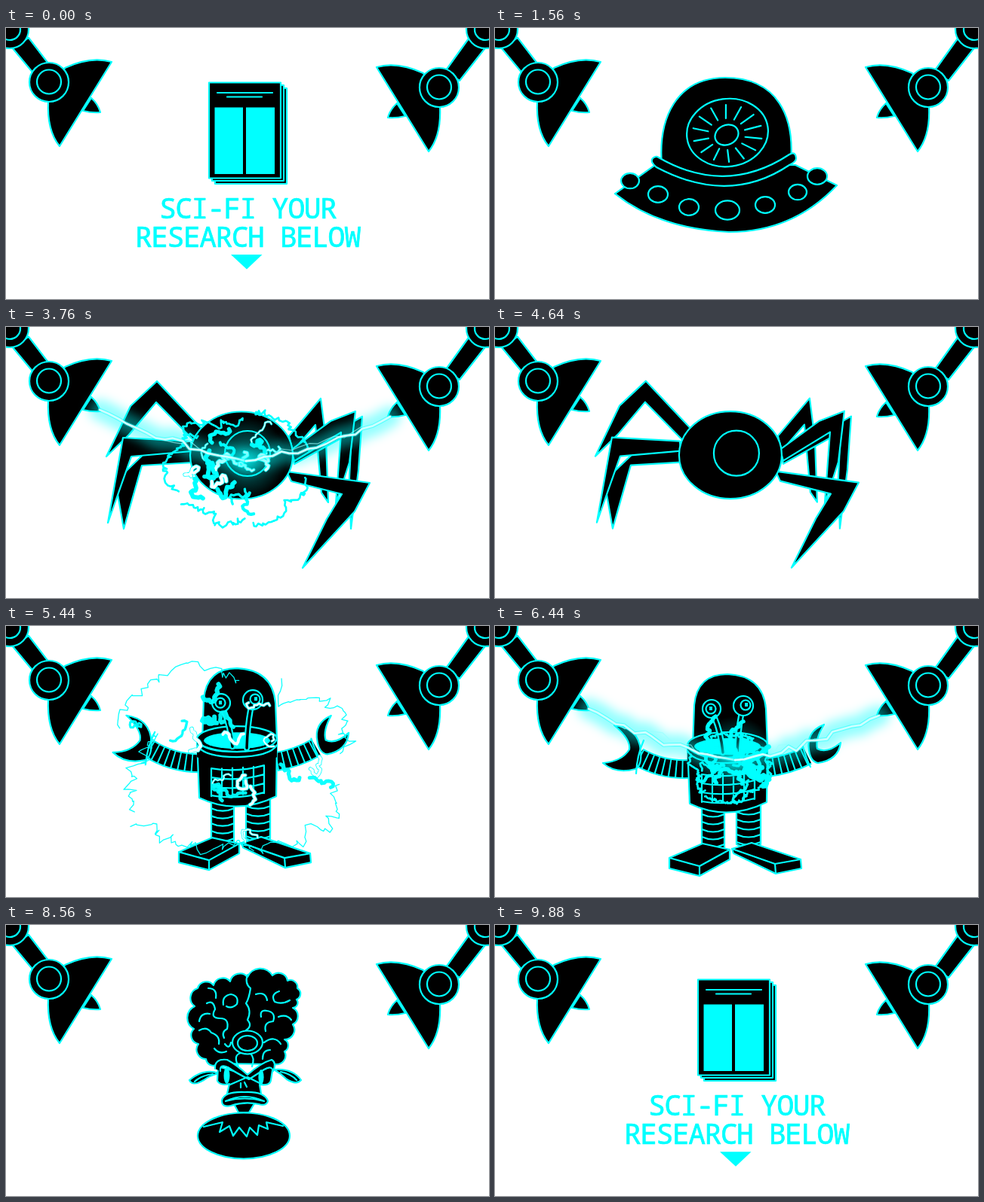
An HTML page with a canvas for the animation above (9.92 s loop, 640 by 360 pixels).

```html
<!DOCTYPE html>
<html lang="en">
<head>
<meta charset="utf-8">
<title>Sci-fi your research</title>
<style>
  html, body { margin: 0; width: 100%; height: 100%; overflow: hidden; background: #fff; }
  svg, canvas { position: absolute; left: 0; top: 0; width: 640px; height: 360px; }
  svg { fill: #000; stroke: #0ff; stroke-width: 2.2; stroke-linejoin: round; stroke-linecap: round; }
  .line { fill: none; }
  .cyan { fill: #0ff; stroke: none; }
  .scene { display: none; }
  text { font: 400 38px "Noto Sans Mono", "DejaVu Sans Mono", monospace; letter-spacing: -1.5px; fill: #0ff; stroke-width: .7; }
  .tube { fill: none; stroke-linecap: butt; }
</style>
</head>
<body>
<svg viewBox="0 0 640 360">
  <defs>
    <g id="gun">
      <path d="M113 93Q122 101 125 112Q114 113 102 110Z"/>
      <path d="M140 45Q112 37 78 53L56 97Q54 136 71 157Z"/>
      <circle cx="57" cy="72" r="26"/>
      <circle cx="57" cy="71.500" r="16"/>
    </g>
    <g id="joint"><circle r="25"/><circle r="14"/></g>
  </defs>

  <g id="book" class="scene">
    <rect x="277" y="80" width="95" height="127"/>
    <rect x="273" y="76" width="95" height="127"/>
    <rect x="269" y="72.500" width="95" height="127"/>
    <path class="line" d="M280 86H353M293 91.500H339"/>
    <path class="cyan" d="M276.500 105.500h37.500v88.500h-37.500zM318 105.500h38v88.500h-38z"/>
    <text x="203" y="252.500">SCI-FI YOUR</text>
    <text x="171" y="291">RESEARCH BELOW</text>
    <path id="arrow" class="cyan" d="M298 301H339.500L319 320.500Z"/>
  </g>

  <g id="ufo" class="scene">
    <path d="M159 220L212 182H398L453 209Q395 271 310 271Q218 267 159 220Z"/>
    <path d="M221 182C216 120 240 66 305 66C375 66 397 118 392 178Q310 225 221 182Z"/>
    <path d="M215 171Q305 224 390 168Q398 163 399 173Q399 178 390 182Q310 236 214 185Q205 178 209 173Q212 170 215 171Z"/>
    <ellipse cx="308" cy="139" rx="54" ry="45" transform="rotate(-8 308 139)"/>
    <ellipse cx="307" cy="142" rx="16" ry="13" transform="rotate(-25 307 142)"/>
    <path id="rays"/>
    <g id="ports"></g>
  </g>

  <g id="spider" class="scene">
    <path d="M262 138L200 72 165 105 133 172 163 143 199 100 250 152Z"/>
    <path d="M247 165L200 152 145 205 156 268 180 184 247 180Z"/>
    <path d="M245 152L155 147 135 260 166 172 246 165Z"/>
    <path d="M375 145L417 95 424 150 427 233 418 220 410 130 380 165Z"/>
    <path d="M380 172L472 119 467 190 457 268 455 200 458 140 382 182Z"/>
    <path d="M378 163L430 125 463 112 455 180 437 235 444 140 382 178Z"/>
    <path d="M372 192L482 207 462 245 393 320 425 255 445 222 378 205Z"/>
    <ellipse cx="312" cy="170.500" rx="68" ry="58"/>
    <circle cx="320" cy="168" r="30"/>
  </g>

  <g id="robot" class="scene">
    <path d="M274 240V296Q289 303 304 296V240ZM320 238V290Q336 298 352 290V238Z"/>
    <path id="bands" class="line"/>
    <path d="M231 308L275 289 311 297V310L271 332 231 322Z"/>
    <path class="line" d="M231 308L271 319 311 297M271 319V332"/>
    <path d="M314 296L340 288 405 310 406 322 372 329 316 302Z"/>
    <path class="line" d="M314 296L371 316 405 310M371 316L372 329"/>
    <g id="armL">
      <g class="arm" data-d="M258 190Q222 192 190 174"></g>
      <path d="M193 165Q190 135 158 132Q180 150 178 164Q168 180 143 182Q160 197 186 190Q195 185 193 165Z"/>
      <path class="line" d="M197 152Q188 172 187 196"/>
    </g>
    <g id="armR">
      <g class="arm" data-d="M360 188Q388 185 414 172"></g>
      <path d="M416 165Q412 140 436 131Q424 150 427 163Q440 170 458 155Q455 178 428 182Q418 180 416 165Z"/>
      <path class="line" d="M408 160Q412 176 418 187"/>
    </g>
    <path d="M262 160L264 105Q268 64 308 64Q355 66 359 110L361 160Z"/>
    <path d="M255 158L258 236Q308 260 360 234L361 158Z"/>
    <ellipse cx="308" cy="158" rx="53" ry="17"/>
    <ellipse class="cyan" cx="308" cy="160" rx="44" ry="11"/>
    <path class="line" d="M291 122Q299 140 302 168M326 119Q322 140 321 170" stroke-width="8"/>
    <path class="line" d="M291 122Q299 140 302 168M326 119Q322 140 321 170" style="stroke:#000" stroke-width="3.500"/>
    <path d="M255 158Q260 175 308 175Q355 174 361 158V182Q308 200 255 182Z" stroke="none"/>
    <path class="line" d="M255 158Q260 175 308 175Q355 174 361 158M255 166Q264 182 308 182Q352 181 361 166"/>
    <circle cx="287" cy="110" r="12"/><circle cx="286" cy="110" r="6.500"/>
    <circle cx="329" cy="106" r="13"/><circle cx="332" cy="105" r="6.500"/>
    <path class="cyan" d="M284 107h4v5h-4zM331 102h4v5h-4z"/>
    <path id="grid" class="line"/>
  </g>

  <g id="alien" class="scene">
    <path id="brain"/>
    <path class="line" d="M266 104Q275 99 277 112Q270 124 284 124Q296 124 293 138Q285 142 289 150M288 106Q286 94 298 92Q309 94 306 105Q299 112 292 108M320 66Q316 78 324 84Q322 98 318 104Q326 114 320 126Q327 134 318 140M338 122Q336 112 346 114Q358 116 354 128Q341 129 344 141M331 92Q344 88 346 100M362 88Q350 92 356 102Q366 106 376 100M268 84Q280 84 278 97M256 140Q266 134 272 143Q284 147 282 158M342 156Q356 146 364 158M276 164Q282 172 292 168M290 158Q296 166 298 156M308 188Q300 172 312 170M326 188Q330 176 324 171M340 178Q340 166 350 166M361 122Q372 118 378 126M270 118Q258 116 256 128"/>
    <ellipse cx="320" cy="156" rx="20" ry="15.500"/><ellipse cx="320" cy="157" rx="13" ry="10"/>
    <path d="M282 197Q262 190 243 206Q247 215 262 206Q270 200 282 197ZM355 192Q380 190 391 206Q385 213 372 205Q364 197 355 192Z"/>
    <path class="line" d="M274 198Q258 200 250 208M364 195Q378 198 385 206"/>
    <path d="M300 234L308 249H322L331 234Z"/>
    <path d="M281 188L280 207Q284 214 296 211L293 224H338L336 212Q350 214 351 206L354 187 322 200Z"/>
    <path d="M277 191Q276 177 293 179Q306 186 320 199Q338 183 352 179Q359 183 354 194Q352 186 342 192L322 205Q304 196 294 189Q283 184 284 194"/>
    <path class="line" d="M297 212L320 202 340 212M311 210V216M316 209L319 215"/>
    <ellipse class="cyan" cx="292.500" cy="200" rx="4" ry="11"/><ellipse class="cyan" cx="338" cy="202" rx="3.600" ry="10"/>
    <path d="M286 233Q289 221 316 222Q343 221 347 234Q345 241 335 238Q316 234 298 240Q286 243 286 233Z"/>
    <path class="line" d="M291 234Q316 222 342 234Q316 227 291 234"/>
    <ellipse cx="315" cy="280" rx="61" ry="30.500"/>
    <path class="line" d="M262 268L287 262 283 275 296 267 301 280 309 269 319 281 323 269 333 279 335 266 347 271 345 262 367 267"/>
  </g>

  <path d="M8 26L30 13 56 47 37 61ZM613 14L637 24 601 70 583 56Z"/>
  <use href="#gun"/>
  <use href="#joint" x="5" y="2"/>
  <use href="#gun" transform="translate(631 7) scale(-1 1)"/>
  <use href="#joint" x="635" y="2"/>
</svg>
<canvas id="sparks" width="640" height="360"></canvas>

<script>
const LOOP = 9920, STEP = LOOP / 7, ZAP = 680, SWAP = 340, TAU = Math.PI * 2;
const $ = id => document.getElementById(id);
const ctx = $('sparks').getContext('2d');

// Scenes after each zap, and the float phase each was drawn at
const order = ['ufo', 'spider', 'spider', 'robot', 'robot', 'alien', 'book'];
const drawnAt = { ufo: .38, spider: .934, robot: .825, alien: .32 };

// Repeated details
const range = n => [...Array(n).keys()];
$('rays').setAttribute('d', range(14).map(i => {
  const a = (i + .4) * TAU / 14, c = Math.cos(a), s = Math.sin(a);
  return `M${307 + 25 * c} ${141 + 21 * s}L${308 + 46 * c} ${140 + 38 * s}`;
}).join(''));
$('ports').innerHTML = [[179, 203, 12], [216, 221, 13], [257, 238, 13], [308, 242, 16],
  [358, 235, 13], [401, 218, 12], [427, 197, 13]]
  .map(([x, y, r]) => `<ellipse cx="${x}" cy="${y}" rx="${r}" ry="${r * .6 + 3}"/>`).join('');
$('bands').setAttribute('d', range(5).map(i =>
  `M274 ${250 + i * 10}q15 7 30 0M320 ${247 + i * 10}q16 7 32 0`).join(''));
$('grid').setAttribute('d',
  range(4).map(i => `M274 ${197 + i * 12}Q308 ${203 + i * 12} 344 ${193 + i * 12}`).join('') +
  range(6).map(i => `M${274 + i * 14} ${198 - i * .8}v36`).join(''));
document.querySelectorAll('.arm').forEach(arm => {
  const tube = rest => `<path class="tube" d="${arm.dataset.d}" ${rest}/>`;
  arm.innerHTML = tube('stroke-width="26"') + tube('stroke-width="22" style="stroke:#000"') +
    tube('stroke-width="24" stroke-dasharray="2 6.500"');
});

const lobes = [[282, 184], [265, 178], [255, 158], [249, 138], [250, 108], [254, 84], [275, 80], [297, 75],
  [320, 69], [353, 67], [373, 74], [386, 84], [385, 99], [380, 110], [380, 132], [369, 152], [369, 168], [357, 185]];
$('brain').setAttribute('d', 'M' + lobes.map(([x, y], i) => {
  if (!i) return `${x} ${y}`;
  const r = Math.hypot(x - lobes[i - 1][0], y - lobes[i - 1][1]) * .56;
  return `A${r} ${r} 0 0 1 ${x} ${y}`;
}).join('') + 'Z');

// Seeded random numbers
let seed = 1;
function rnd() {
  seed = seed + 0x6D2B79F5 | 0;
  let n = Math.imul(seed ^ seed >>> 15, 1 | seed);
  n = n + Math.imul(n ^ n >>> 7, 61 | n) ^ n;
  return ((n ^ n >>> 14) >>> 0) / 4294967296;
}
const jit = a => (rnd() - .5) * 2 * a;
const clamp = (v, lo, hi) => Math.max(lo, Math.min(hi, v));

function trace(pts, color, width, alpha = 1) {
  ctx.globalAlpha = alpha;
  ctx.strokeStyle = color;
  ctx.lineWidth = width;
  ctx.beginPath();
  pts.forEach(p => ctx.lineTo(...p));
  ctx.stroke();
}

function bolt(x, y, sag, amp) {
  const n = 16;
  return range(n + 1).map(i => {
    const f = i / n, bend = Math.sin(f * Math.PI);
    return [x + (318 - x) * f + jit(3) * bend, y + (178 - y) * f + sag * bend + jit(amp) * bend];
  });
}

function beam(x, y, power) {
  const main = bolt(x, y, 9, 6);
  ctx.filter = 'blur(7px)';
  trace(main, '#0ff', 28, .42 * power);
  ctx.filter = 'none';
  trace(bolt(x, y, 6, 9), '#9ff', 1.2, .7 * power);
  trace(main, '#0ff', 5, .45 * power);
  trace(main, '#cff', 2.8, power);
}

function glow(power) {
  const g = ctx.createRadialGradient(318, 174, 4, 318, 174, 54);
  g.addColorStop(0, '#0ff');
  g.addColorStop(1, '#0ff0');
  ctx.globalAlpha = .45 * power;
  ctx.fillStyle = g;
  ctx.fillRect(255, 110, 126, 126);
}

// Expanding cloud of sparks
function cloud(age) {
  const ry = Math.min(138, 25 + age * .22), rx = ry * 1.2;
  const cx = 314 - age * .03, cy = 190 - age * .015;
  const fade = Math.min(1, (660 - age) / 160);
  for (let j = 0; j < 5; j++) {
    let a = j * TAU / 5 + jit(.3), r = .92;
    trace(range(46).map(() => {
      a += .025 + jit(.03);
      r = clamp(r + jit(.06), .66, 1.04);
      return [cx + rx * r * Math.cos(a), cy + ry * r * Math.sin(a)];
    }), '#0ff', age < 300 ? 2.6 : 1.3, fade);
  }
  for (let j = 0; j < 18; j++) {
    const a = rnd() * TAU, r = .15 + rnd() * .7, size = 1 + rnd() * 4 * fade;
    let x = cx + rx * r * Math.cos(a), y = cy + ry * r * Math.sin(a), dir = rnd() * TAU;
    const pts = range(14).map(() => {
      dir += jit(1.5);
      return [x += Math.cos(dir) * 3.5, y += Math.sin(dir) * 3.5];
    });
    trace(pts, '#0ff', size + 1.6, fade);
    if (age > 150 && j % 2) trace(pts, '#fff', size, fade);
  }
}

const float = u => -5 * Math.sin(u * TAU);
let shown;

function draw(now) {
  const t = Math.floor(now % LOOP / 40) * 40;
  const since = (t - ZAP - SWAP + LOOP) % LOOP;
  const name = order[Math.floor(since / STEP)];
  if (name !== shown) {
    if (shown) $(shown).style.display = 'none';
    $(shown = name).style.display = 'block';
  }
  if (name === 'book') {
    $('arrow').setAttribute('transform', `translate(0 ${6 - 6 * Math.cos(t / 992 * TAU)})`);
  } else {
    const dy = float(since / STEP % 1) - float(drawnAt[name]);
    $(name).setAttribute('transform', `translate(${dy * .25} ${dy})`);
    $('armL').setAttribute('transform', `rotate(${-dy * .4} 258 190)`);
    $('armR').setAttribute('transform', `rotate(${dy * .4} 360 188)`);
  }

  ctx.clearRect(0, 0, 640, 360);
  ctx.lineJoin = ctx.lineCap = 'round';
  const zapTime = (t - ZAP + LOOP) % LOOP, age = zapTime % STEP;
  const power = clamp(Math.min(age / 60, (440 - age) / 80), 0, 1);
  seed = Math.floor(zapTime / STEP) * 991 + Math.floor(age / 80) * 37 + 5;
  if (power) glow(power);
  if (age > 30 && age < 660) cloud(age);
  if (power) {
    beam(124, 110, power);
    beam(509, 119, power);
  }
}

function tick() {
  draw(performance.now());
  requestAnimationFrame(tick);
}
tick();
</script>
</body>
</html>
```
